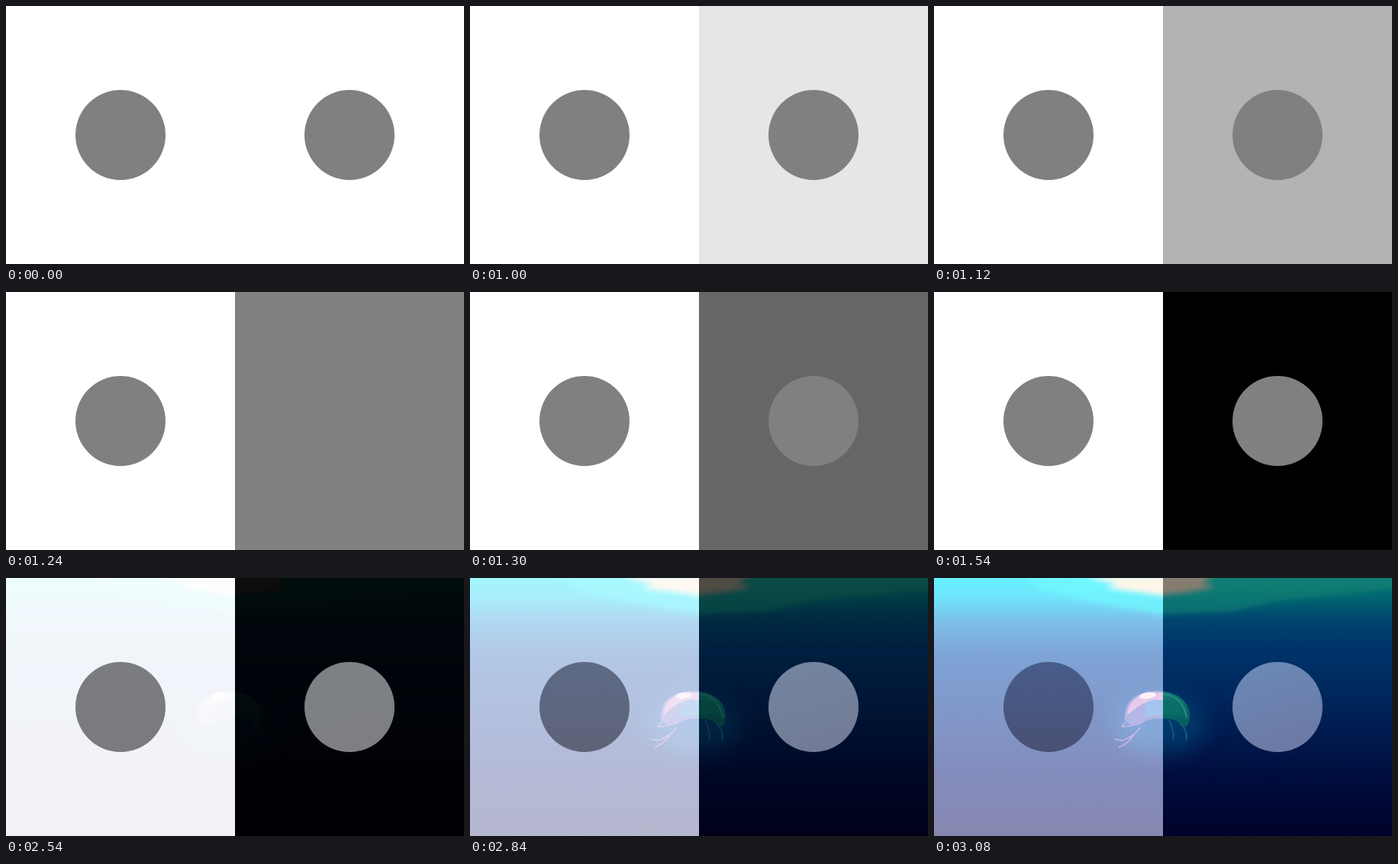
These frames come from a looping animation (600 by 338 pixels, 6080 ms). An HTML page:

```html
<!DOCTYPE html>
<html lang="en">
<head>
<meta charset="utf-8">
<title>Grey circles</title>
<style>
  html, body { margin: 0; height: 100%; overflow: hidden; background: #fff; }
  svg { display: block; width: 100vw; height: 100vh; }
</style>
</head>
<body>
<svg viewBox="0 0 600 338">
  <defs>
    <linearGradient id="day" x2="0" y2="1">
      <stop offset="0" stop-color="#66f2ff"/>
      <stop offset=".08" stop-color="#70e2fb"/>
      <stop offset=".17" stop-color="#7dbfe9"/>
      <stop offset=".3" stop-color="#7fa3d6"/>
      <stop offset=".5" stop-color="#8199cb"/>
      <stop offset=".75" stop-color="#838dbd"/>
      <stop offset="1" stop-color="#8788b0"/>
    </linearGradient>
    <linearGradient id="night" x2="0" y2="1">
      <stop offset="0" stop-color="#0c7a72"/>
      <stop offset=".09" stop-color="#006070"/>
      <stop offset=".16" stop-color="#00456d"/>
      <stop offset=".27" stop-color="#00346a"/>
      <stop offset=".5" stop-color="#002358"/>
      <stop offset=".75" stop-color="#000e40"/>
      <stop offset="1" stop-color="#00022a"/>
    </linearGradient>
    <linearGradient id="dayDisc" x2="0" y2="1">
      <stop stop-color="#485d8b"/>
      <stop offset="1" stop-color="#495074"/>
    </linearGradient>
    <linearGradient id="nightDisc" x2=".3" y2="1">
      <stop stop-color="#6b8ab9"/>
      <stop offset="1" stop-color="#6c7aa5"/>
    </linearGradient>
    <linearGradient id="bellNight" x2=".3" y2="1">
      <stop stop-color="#12807c"/>
      <stop offset="1" stop-color="#07605f"/>
    </linearGradient>
    <clipPath id="left"><path d="M0 0H300V338H0Z"/></clipPath>
    <clipPath id="right"><path d="M300 0H600V338H300Z"/></clipPath>
    <filter id="soft" x="-30%" y="-60%" width="160%" height="220%"><feGaussianBlur stdDeviation="3"/></filter>
    <filter id="haze" x="-50%" y="-50%" width="200%" height="200%"><feGaussianBlur stdDeviation="14"/></filter>
    <filter id="fine"><feGaussianBlur stdDeviation=".7"/></filter>
    <path id="bell" d="M250 186C248 160 268 148 291 148C316 148 335 160 335 181Q334 196 327 195Q318 183 300 184Q280 183 270 192Q258 196 250 186Z"/>
    <path id="arms" d="M252 189Q244 195 247 195Q262 194 273 188M270 196Q262 208 246 213L237 211M262 205Q256 216 242 222M308 186Q316 204 313 212M322 190Q334 202 330 213"/>
  </defs>

  <rect width="600" height="338" fill="#fff"/>
  <rect id="shade" x="300" width="300" height="338" fill="#fff"/>
  <g fill="#808080">
    <circle cx="150" cy="169" r="59"/>
    <circle cx="450" cy="169" r="59"/>
  </g>

  <g id="sea" opacity="0">
    <g clip-path="url(#left)">
      <rect width="300" height="338" fill="url(#day)"/>
      <g filter="url(#soft)">
        <path d="M110 -8H310V50L250 40L190 28L140 16Z" fill="#70faff" opacity=".65"/>
        <path d="M198 -2H310V24L262 17L225 13L242 8Z" fill="#fff6ea"/>
      </g>
      <ellipse cx="290" cy="190" rx="55" ry="40" fill="#85b5e5" opacity=".6" filter="url(#haze)"/>
      <g filter="url(#fine)">
        <use href="#bell" fill="#b4b6e5"/>
        <path d="M253 180Q255 155 282 151L300 150V160Q276 160 264 171Q257 176 253 180Z" fill="#e8cbec"/>
        <ellipse cx="280" cy="154" rx="11" ry="4" fill="#fff1f5" transform="rotate(-8 280 154)"/>
        <path d="M277 163Q288 157 300 161V180Q283 180 275 183Z" fill="#a3c5ee"/>
        <use href="#arms" fill="none" stroke="#cdb6e4" stroke-width="1.6"/>
      </g>
    </g>
    <g clip-path="url(#right)">
      <rect x="300" width="300" height="338" fill="url(#night)"/>
      <g filter="url(#soft)">
        <path d="M290 -8H620V12L530 22L450 30L390 44L290 48Z" fill="#128274" opacity=".6"/>
        <path d="M290 -8H372L350 6L366 12L328 18L290 22Z" fill="#857d70"/>
      </g>
      <ellipse cx="305" cy="192" rx="50" ry="38" fill="#064c7b" opacity=".6" filter="url(#haze)"/>
      <g filter="url(#fine)">
        <use href="#bell" fill="url(#bellNight)"/>
        <path d="M300 160Q320 160 326 180Q315 176 300 179Z" fill="#087064"/>
        <path d="M300 152Q326 154 331 183" fill="none" stroke="#2b8b80" stroke-width="2"/>
        <use href="#arms" fill="none" stroke="#17577f" stroke-width="2"/>
      </g>
    </g>
    <circle cx="150" cy="169" r="59" fill="url(#dayDisc)"/>
    <circle cx="450" cy="169" r="59" fill="url(#nightDisc)"/>
  </g>
</svg>
<script>
const LOOP = 6080, STEP = 60, STEPS = 10;
const shade = document.getElementById("shade");
const sea = document.getElementById("sea");

// Stepped fade: the first tenth appears at the start time itself.
const fade = (t, start) =>
  Math.max(0, Math.min(STEPS, Math.floor((t - start) / STEP) + 1)) / STEPS;

function draw() {
  const t = performance.now() % LOOP;
  const grey = Math.round(255 * (1 - fade(t, 1000)));
  shade.setAttribute("fill", `rgb(${grey},${grey},${grey})`);
  sea.setAttribute("opacity", fade(t, 2540));
  requestAnimationFrame(draw);
}
draw();
</script>
</body>
</html>
```
